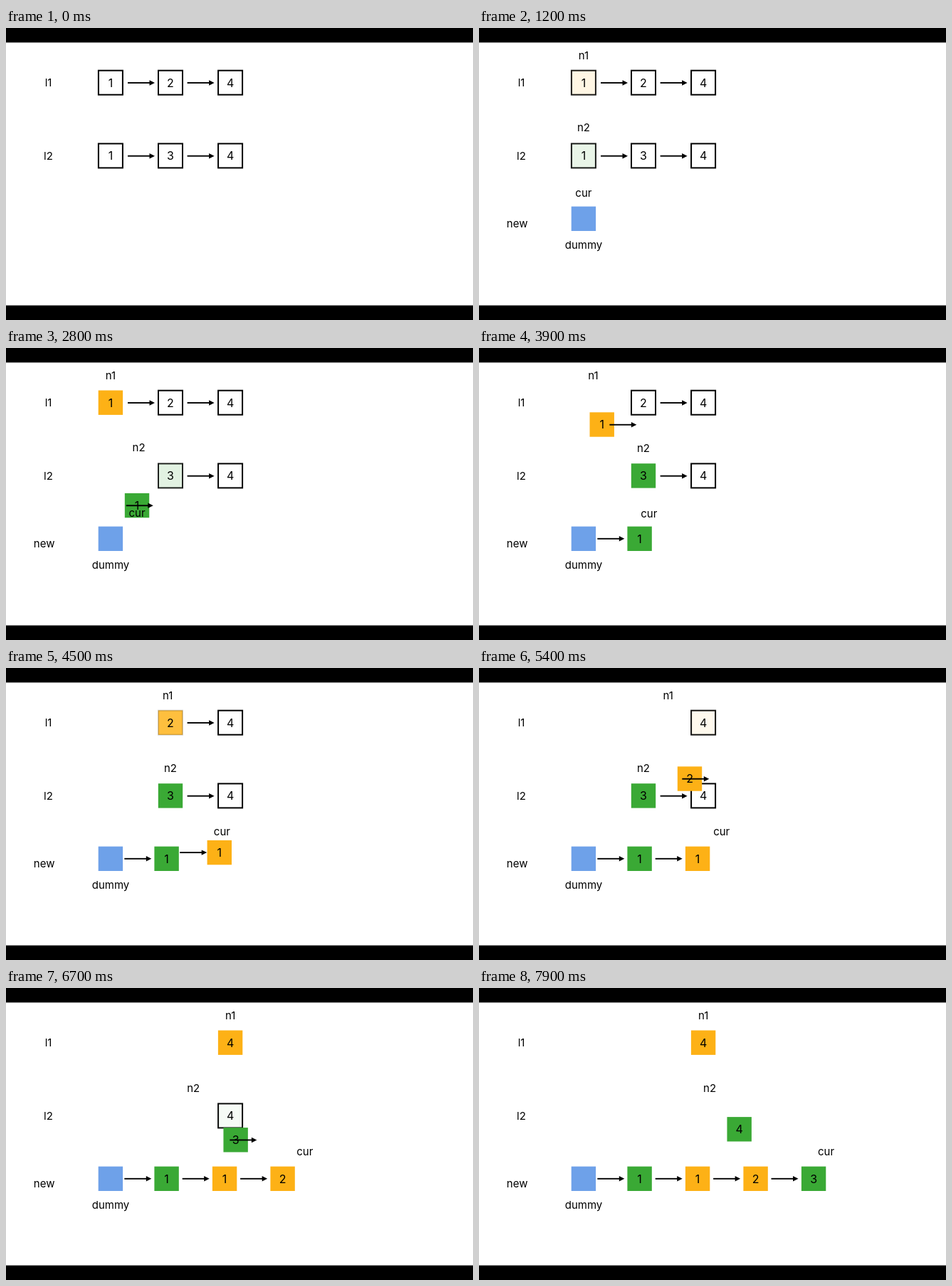
Animation of 656x410 px, one loop 8 s. Source, as an HTML page with a canvas:

```html
<!DOCTYPE html>
<html lang="en">
<head>
<meta charset="utf-8">
<title>Merging two sorted lists</title>
<style>
  html, body { margin: 0; width: 100%; height: 100%; overflow: hidden; background: #fff; }
  canvas { display: block; }
</style>
</head>
<body>
<canvas id="stage" width="656" height="410"></canvas>
<script>
const ctx = document.getElementById('stage').getContext('2d');
const LOOP = 8000, FIRST_MOVE = 2319, MOVE_GAP = 1319, MOVE_TIME = 1000;
const ORANGE = '#fdb116', GREEN = '#3aa935', BLUE = '#6ea1e9';
const rowY = [76.7, 179.4], mergedY = 267.8;

// Nodes in the order in which they join the merged list.
const nodes = [
  { value: 1, row: 1, col: 0 },
  { value: 1, row: 0, col: 0 },
  { value: 2, row: 0, col: 1 },
  { value: 3, row: 1, col: 1 },
  { value: 4, row: 1, col: 2 },
  { value: 4, row: 0, col: 2 }
];

const clamp = v => Math.max(0, Math.min(1, v));
const ramp = (t, from, to) => clamp((t - from) / (to - from));
const mix = (a, b, p) => a + (b - a) * p;
const colX = col => 146.9 + 84.1 * col;
const mergedX = i => i < 0 ? 146.9 : 225.6 + 81.5 * i;
const moveStart = i => FIRST_MOVE + MOVE_GAP * i;

// Eased progress of the move of node i; the last node never moves here.
function moved(i, t) {
  if (i > 4) return 0;
  const u = ramp(t, moveStart(i), moveStart(i) + MOVE_TIME);
  return (1 - Math.cos(Math.PI * u)) / 2;
}

// A node takes its colour while the one before it in its row moves away.
function coloured(node, t) {
  if (node.col === 0) return ramp(t, 1100, 2000);
  const before = nodes.findIndex(n => n.row === node.row && n.col === node.col - 1);
  const start = moveStart(before);
  return ramp(t, start + 400, start + 960);
}

function text(str, x, y, size = 15) {
  ctx.font = `${size}px Inter, "Open Sans", sans-serif`;
  ctx.fillStyle = '#000';
  ctx.fillText(str, x, y);
}

function square(x, y, colour) {
  ctx.fillStyle = colour;
  ctx.fillRect(x - 17.2, y - 17.2, 34.4, 34.4);
}

function drawNode(node, i, t) {
  const p = moved(i, t), tint = coloured(node, t);
  const x = mix(colX(node.col), mergedX(i), p);
  const y = mix(rowY[node.row], mergedY, p);
  if (tint > 0) square(x, y, node.row ? GREEN : ORANGE);
  if (tint < 1) {
    ctx.globalAlpha = 1 - tint;
    square(x, y, '#fff');
    ctx.strokeStyle = '#000';
    ctx.lineWidth = 2;
    ctx.strokeRect(x - 17, y - 17, 34, 34);
    ctx.globalAlpha = 1;
  }
  text(node.value, x, y + 5.8, 16);
}

function drawArrow(node, i, t) {
  if (node.col > 1) return;
  const p = moved(i, t);
  const x = mix(171 + 83.6 * node.col, 166.3 + 81.4 * i, p);
  const y = mix(rowY[node.row] + .3, mergedY, p);
  ctx.fillStyle = '#000';
  ctx.fillRect(x, y - .95, 32, 1.9);
  ctx.beginPath();
  ctx.moveTo(x + 30.5, y - 3.7);
  ctx.lineTo(x + 38, y);
  ctx.lineTo(x + 30.5, y + 3.7);
  ctx.fill();
}

// Sum of each pointer's finished and running steps.
function pointerX(row, t) {
  return nodes.reduce((x, n, i) =>
    n.row === row ? x + moved(i, t) * (n.col < 2 ? 84.1 : 42) : x, 146.9);
}

function draw(t) {
  ctx.fillStyle = '#fff';
  ctx.fillRect(0, 0, 656, 410);
  ctx.fillStyle = '#000';
  ctx.fillRect(0, 0, 656, 20.4);
  ctx.fillRect(0, 389.5, 656, 20.5);
  ctx.textAlign = 'center';

  for (let i = nodes.length - 1; i >= 0; i--) drawNode(nodes[i], i, t);
  nodes.forEach((n, i) => drawArrow(n, i, t));
  text('l1', 59.5, 82.3);
  text('l2', 59.5, 185);

  ctx.globalAlpha = ramp(t, 420, 800);
  square(146.9, mergedY, BLUE);
  text('new', 53.6, 280);
  text('dummy', 147, 310);
  text('n1', pointerX(0, t), 43.8);
  text('n2', pointerX(1, t), 144.8 + 1.3 * moved(0, t));
  let curX = mergedX(-1);
  for (let i = 0; i < 5; i++) curX += moved(i, t) * (mergedX(i) - mergedX(i - 1));
  text('cur', curX, 236.5 + 2 * moved(0, t) - 3.3 * moved(1, t));
  ctx.globalAlpha = 1;
}

function frame() {
  draw(performance.now() % LOOP);
  requestAnimationFrame(frame);
}
frame();
</script>
</body>
</html>
```
